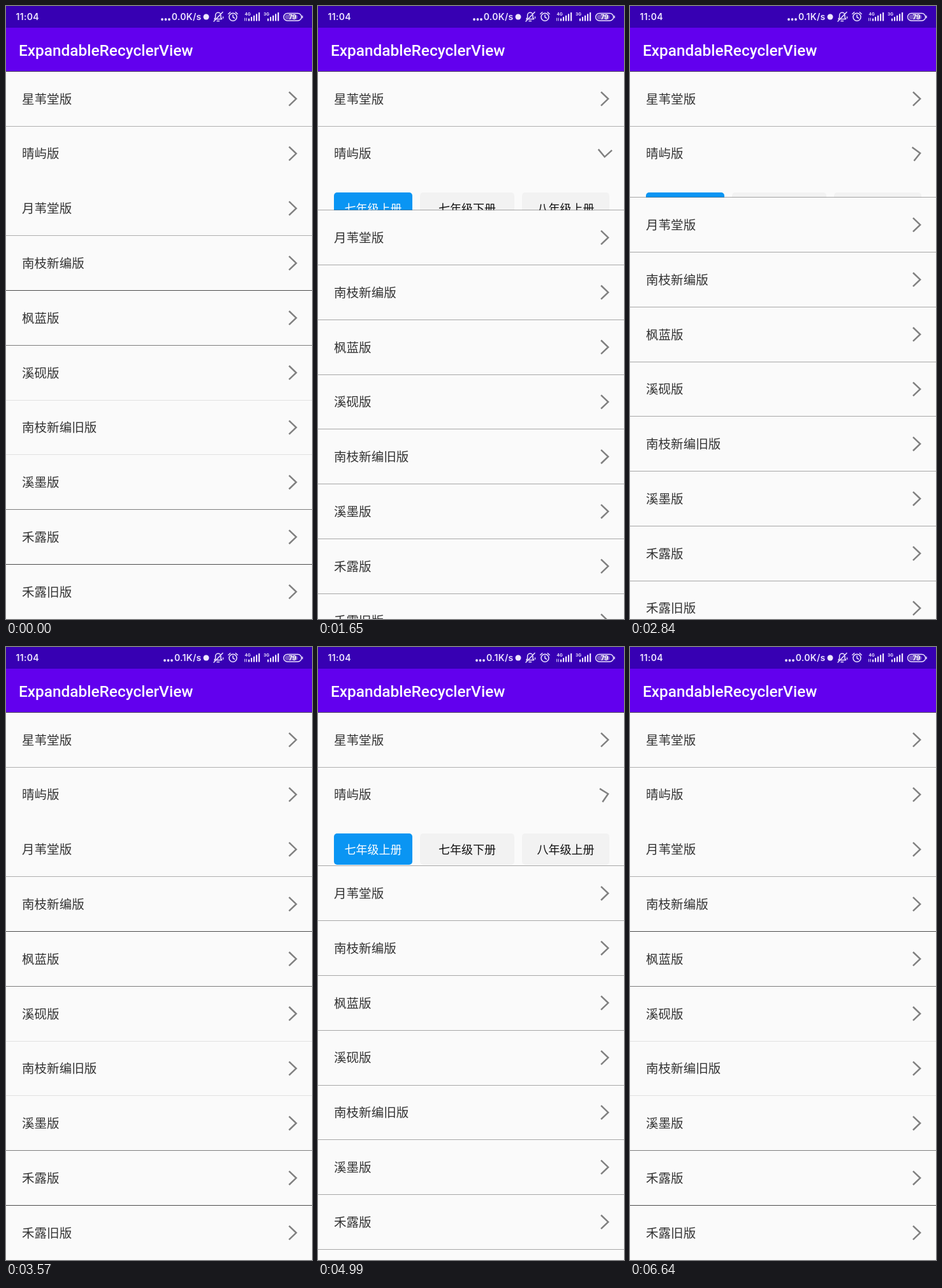
Write an HTML page that moves like this. It is 480 px wide and 960 px high and loops after 6.68 s.

```html
<!DOCTYPE html>
<html lang="zh-CN">
<head>
<meta charset="utf-8">
<title>ExpandableRecyclerView</title>
<style>
  html, body { margin: 0; width: 100%; height: 100%; overflow: hidden; background: #fafafa; }
  svg { display: block; width: 100vw; height: 100vh; }
  .cjk { font-family: "Noto Sans CJK SC", "Noto Sans CJK", sans-serif; }
  .label { font-size: 19.56px; fill: #333; }
  .chip { font-size: 18px; text-anchor: middle; fill: #111; }
  .title { font: 500 24.4px Roboto, sans-serif; fill: #fff; }
  .status { font: 600 14px Inter, sans-serif; letter-spacing: .3px; fill: #eee6ff; }
  .tiny { font: 700 6.5px Inter, sans-serif; fill: #eee6ff; }
  .arrow { fill: none; stroke: #808080; stroke-width: 2.5; }
  .icon { fill: none; stroke: #eee6ff; stroke-width: 1.5; stroke-linecap: round; stroke-linejoin: round; }
  .solid { fill: #eee6ff; }
</style>
</head>
<body>
<svg viewBox="0 0 480 960">
  <defs>
    <clipPath id="panelClip"><rect id="panelBox" x="0" y="274" width="480" height="0"/></clipPath>
  </defs>
  <rect width="480" height="960" fill="#fafafa"/>
  <g id="panel" class="cjk" clip-path="url(#panelClip)"></g>
  <g id="rows" class="cjk"></g>
  <g id="lines" fill="#333"></g>

  <rect width="480" height="34" fill="#3700b3"/>
  <rect y="34" width="480" height="68" fill="#6200ee"/>
  <rect y="102" width="480" height="1" fill="#4b4154"/>
  <text class="title" x="20" y="78">ExpandableRecyclerView</text>

  <text class="status" x="15.5" y="22">11:04</text>
  <g id="dots" class="solid">
    <circle cx="245" cy="21" r="1.9"/><circle cx="250.5" cy="21" r="1.9"/><circle cx="256" cy="21" r="1.9"/>
  </g>
  <text id="speed" class="status" x="306.5" y="22" text-anchor="end"></text>
  <circle class="solid" cx="314" cy="17" r="4.5"/>
  <g class="icon">
    <path d="M327 20.5h11.5l-1.5-2.5v-3.5a4.2 4.2 0 0 0-8.4 0v3.5zM331 23.5h3.5M326 24L340 9.5M340.5 17v2"/>
    <circle cx="356" cy="17.3" r="6"/>
    <path d="M356 14v3.5l2.5 1.5M348.8 12.5l3-2.7M363.2 12.5l-3-2.7"/>
  </g>
  <text class="tiny" x="374.5" y="15">4G</text>
  <text class="tiny" x="404" y="15">3G</text>
  <path class="icon" style="stroke-width:1" d="M374.7 19v4M377.3 19v4"/>
  <g id="signal" class="solid"></g>
  <rect x="435.5" y="11.5" width="28" height="11.5" rx="5.75" fill="none" stroke="#eee6ff" stroke-width="1.4"/>
  <rect x="437.5" y="13.5" width="20" height="7.5" rx="3.5" fill="#7552c4"/>
  <path class="icon" d="M465 15.8v2.6"/>
  <text x="449.5" y="21" text-anchor="middle" font-family="Inter, sans-serif" font-size="10" font-weight="700" fill="#fff">79</text>
</svg>
<script>
const LOOP = 6680, MOVE_MS = 250;
const FIRST_TAP = 1558.5, TAP_GAP = 1100, TAPS = 4;
const SCALE = 2.25;                       // device pixels per stage pixel
const TOP = 230, ROW = 193, PANEL = 343;  // device pixels
const OPEN_ROW = 1;
const NAMES = ["星苇堂版", "晴屿版", "月苇堂版", "南枝新编版", "枫蓝版",
               "溪砚版", "南枝新编旧版", "溪墨版", "禾露版", "禾露旧版"];
const GRADES = ["七年级上册", "七年级下册", "八年级上册", "八年级下册", "九年级上册", "九年级下册"];
const COLUMNS = [[25, 123], [160, 148], [320, 137]];

const $ = id => document.getElementById(id);
const smooth = k => (1 - Math.cos(Math.PI * k)) / 2;
const overshoot = k => 1 + (k - 1) ** 2 * (3 * (k - 1) + 2);

function add(parent, tag, attrs, text) {
  const el = document.createElementNS("http://www.w3.org/2000/svg", tag);
  for (const key in attrs) el.setAttribute(key, attrs[key]);
  if (text) el.textContent = text;
  return parent.appendChild(el);
}

const rows = NAMES.map(name => {
  const row = add($("rows"), "g", {});
  add(row, "text", { class: "label", x: 25, y: 7.3 }, name);
  const arrow = add(row, "path", { class: "arrow", d: "M-6-10.7L5.2 0L-6 10.7" });
  return { row, arrow };
});

const lines = NAMES.map(() => add($("lines"), "rect", { width: 480, height: 1 }));

GRADES.forEach((grade, i) => {
  const [x, width] = COLUMNS[i % 3];
  const y = i < 3 ? 292 : 359.5;
  add($("panel"), "rect", { x, y, width, height: 49, rx: 5, fill: i ? "#f2f2f2" : "#0a95f3" });
  const label = add($("panel"), "text", { class: "chip", x: x + width / 2, y: y + 31.5 }, grade);
  if (!i) label.style.fill = "#fff";
});

for (const x of [380, 410])
  for (let i = 0; i < 5; i++) {
    const height = 4 + i * 2.4;
    add($("signal"), "rect", { x: x + i * 4, y: 23.5 - height, width: 2.2, height, rx: .6 });
  }

// Each tap reverses the panel: even taps open it, odd taps close it.
function panelState(t) {
  const tap = Math.min(TAPS - 1, Math.floor((t - FIRST_TAP) / TAP_GAP));
  if (tap < 0) return { open: 0, turn: 0, moving: false };
  const k = Math.min(1, (t - FIRST_TAP - tap * TAP_GAP) / MOVE_MS);
  const toward = value => tap % 2 ? 1 - value : value;
  return { open: toward(smooth(k)), turn: 90 * toward(overshoot(k)), moving: k < 1 };
}

// A resting one-pixel device line fades with its distance from the nearest stage row.
function placeLine(line, pos, moving) {
  const y = Math.round((pos + .5) / SCALE - .5);
  const weight = 1 - Math.abs(pos - ((y + .5) * SCALE - .5));
  line.setAttribute("y", y);
  line.setAttribute("opacity", moving ? .42 : Math.max(0, weight));
}

function draw(t) {
  const { open, turn, moving } = panelState(t);
  const shift = Math.round(PANEL * open);
  $("panelBox").setAttribute("height", shift / SCALE);

  rows.forEach(({ row, arrow }, i) => {
    const offset = i > OPEN_ROW ? shift : 0;
    const y = (TOP + 97 + ROW * i + offset) / SCALE;
    row.setAttribute("transform", `translate(0 ${y})`);
    arrow.setAttribute("transform", `translate(450 0) rotate(${i === OPEN_ROW ? turn : 0})`);
    const below = i >= OPEN_ROW;
    placeLine(lines[i], TOP + ROW * (i + 1) + (below ? shift : 0), below && moving);
  });

  const busy = t >= 2400 && t < 6000;
  $("speed").textContent = busy ? "0.1K/s" : "0.0K/s";
  $("dots").setAttribute("transform", `translate(${busy ? 4 : 0} 0)`);
}

function tick() {
  draw(performance.now() % LOOP);
  requestAnimationFrame(tick);
}
tick();
</script>
</body>
</html>
```
